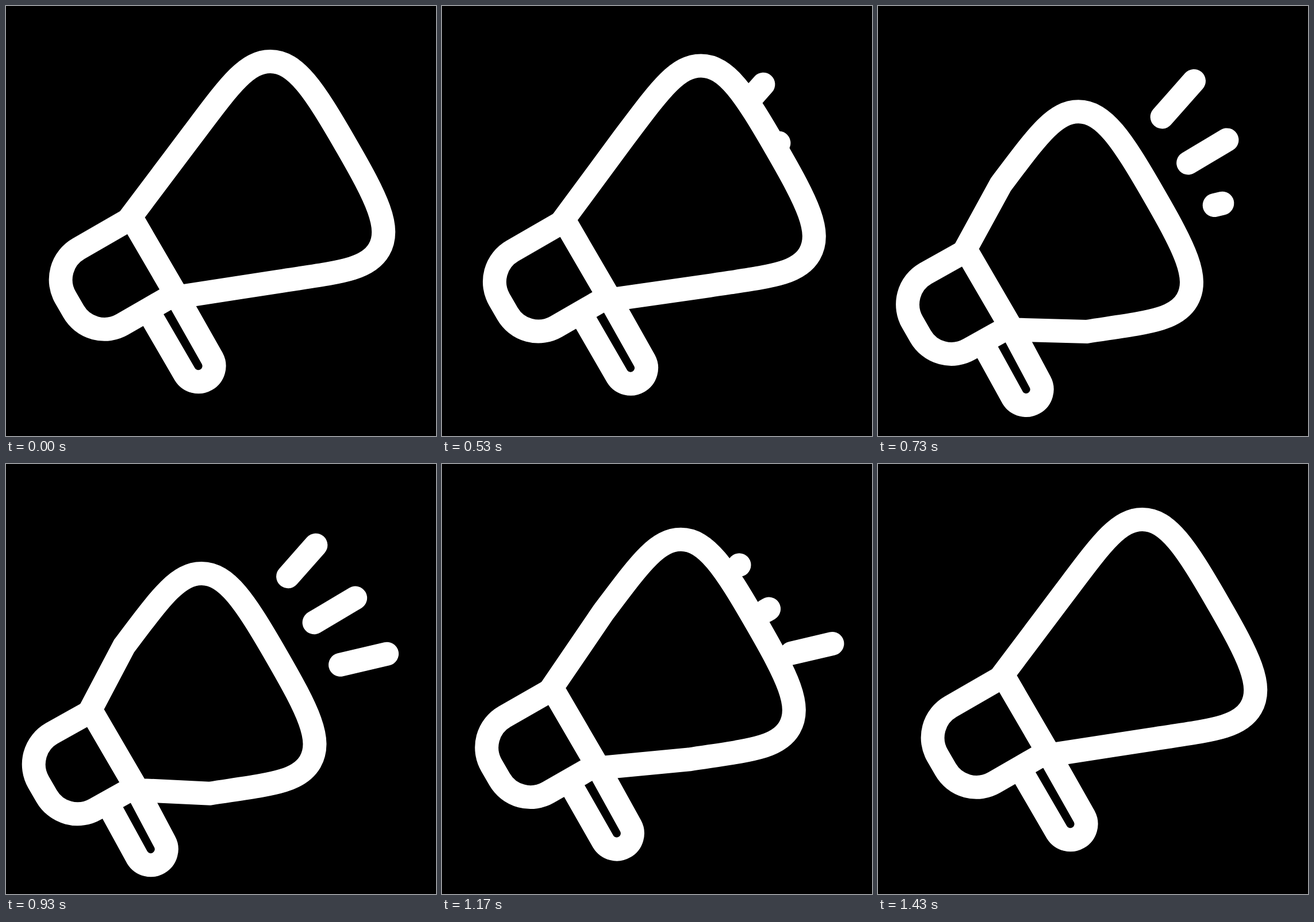
These frames come from a looping animation (748 by 748 pixels, 1.63 s). An HTML page:

```html
<!DOCTYPE html>
<html lang="en">
<head>
<meta charset="utf-8">
<title>Megaphone</title>
<style>
  html, body { margin: 0; width: 100%; height: 100%; overflow: hidden; background: #000; }
  svg { display: block; width: 100vw; height: 100vh; }
  path { fill: none; stroke: #fff; stroke-width: 41; }
  .ray { stroke-linecap: round; }
</style>
</head>
<body>
<svg viewBox="0 0 748 748">
  <path id="horn"/>
  <path id="body"/>
  <path id="grip"/>
  <path class="ray"/>
  <path class="ray"/>
  <path class="ray"/>
</svg>
<script>
const LOOP = 1630;
const COS = Math.cos(Math.PI / 6), SIN = 0.5;
const START = 11, TURN = 27, SPAN = 16;   // in ticks of 1/30 s
const RAY_SPAN = 10.8, RAY_HOLD = 13.35, RAY_LENGTH = 83.5;

// How far each part travels at full recoil
const TRAVEL = { horn: [-120, 94.3], joint: [-70, 61], body: [-47, 46.5], grip: [-83, 44], ray: [-53, 40.3] };

const RAYS = [
  { x: 543.5, y: 155.5, angle: 48.5, start: 11 },
  { x: 589, y: 235.5, angle: 30.8, start: 14 },
  { x: 634.5, y: 309, angle: 13.2, start: 18 }
];

const clamp = x => Math.min(1, Math.max(0, x));

// Cubic easing with flat ends; a and b are the handle abscissas
function easing(a, b) {
  return value => {
    const x = clamp(value);
    let lo = 0, hi = 1;
    for (let i = 0; i < 30; i++) {
      const s = (lo + hi) / 2, r = 1 - s;
      if (3 * a * s * r * r + 3 * b * s * s * r + s * s * s < x) lo = s; else hi = s;
    }
    return lo * lo * (3 - 2 * lo);
  };
}
const hornOut = easing(0.84, 0.143), hornBack = easing(0.78, 0.148);
const rayOut = easing(0.78, 0.137), rayBack = easing(0.85, 0.15);
const grow = easing(0.73, 0.27);

const swing = (tick, out, back) => out((tick - START) / SPAN) - back((tick - TURN) / SPAN);

const mover = ([dx, dy], q) => (x, y) => `${(x + dx * q).toFixed(2)} ${(y + dy * q).toFixed(2)} `;

// u runs along the megaphone's axis, v across it
const tilted = move => (u, v) => move(COS * u + SIN * v, COS * v - SIN * u);

function hornPath(q) {
  const joint = mover(TRAVEL.joint, q), local = tilted(mover(TRAVEL.horn, q));
  const top = (u, w) => local(u, 503.5 - w), low = (u, w) => local(u, 503.5 + w);
  return "M" + joint(217, 366.4) + "L" + top(170, 148) +
    "C" + top(266.7, 189) + top(313.6, 211) + top(350, 190) +
    "C" + top(388.1, 168) + top(391.3, 110) + top(391.3, 0) +
    "C" + low(391.3, 109) + low(388.1, 166) + low(350, 188) +
    "C" + low(313.6, 209) + low(268, 186) + low(171, 148.5) +
    "L" + joint(298.5, 506.3) + "Z";
}

function bodyPath(q) {
  const joint = mover(TRAVEL.joint, q), local = tilted(mover(TRAVEL.body, q));
  const arc = "A62 62 0 0 0 ";
  return "M" + joint(218.5, 369) + "L" + local(-101.9, 428.8) +
    arc + local(-163.9, 490.8) + "L" + local(-163.9, 518.9) +
    arc + local(-101.9, 580.9) + "L" + joint(295, 500.5);
}

function gripPath(q) {
  const joint = mover(TRAVEL.joint, q), end = mover(TRAVEL.grip, q);
  return "M" + joint(246, 528.5) + "L" + end(311.2, 640.75) +
    "A27.5 27.5 0 0 0 " + end(358.8, 613.25) + "L" + joint(295, 500.5);
}

function rayPath(ray, tick, q) {
  const age = tick - ray.start;
  if (age < 0 || age >= RAY_HOLD + RAY_SPAN) return "";
  const part = grow(age / RAY_SPAN) - grow((age - RAY_HOLD) / RAY_SPAN);
  const length = Math.max(0.02, RAY_LENGTH * part);
  const angle = ray.angle * Math.PI / 180, at = mover(TRAVEL.ray, q);
  return "M" + at(ray.x, ray.y) +
    "L" + at(ray.x + length * Math.cos(angle), ray.y - length * Math.sin(angle));
}

// Thirty ticks a second, each starting on a multiple of 10 ms
function tickAt(ms) {
  const rest = ms % 100;
  return 3 * Math.floor(ms / 100) + (rest >= 70 ? 2 : rest >= 30 ? 1 : 0);
}

const horn = document.getElementById("horn");
const body = document.getElementById("body");
const grip = document.getElementById("grip");
const rays = document.querySelectorAll(".ray");

function draw(ms) {
  const tick = tickAt(ms);
  const q = swing(tick, hornOut, hornBack), rayShift = swing(tick, rayOut, rayBack);
  horn.setAttribute("d", hornPath(q));
  body.setAttribute("d", bodyPath(q));
  grip.setAttribute("d", gripPath(q));
  RAYS.forEach((ray, i) => rays[i].setAttribute("d", rayPath(ray, tick, rayShift)));
}

const began = performance.now();
function frame() {
  draw((performance.now() - began) % LOOP);
  requestAnimationFrame(frame);
}
frame();
</script>
</body>
</html>
```
